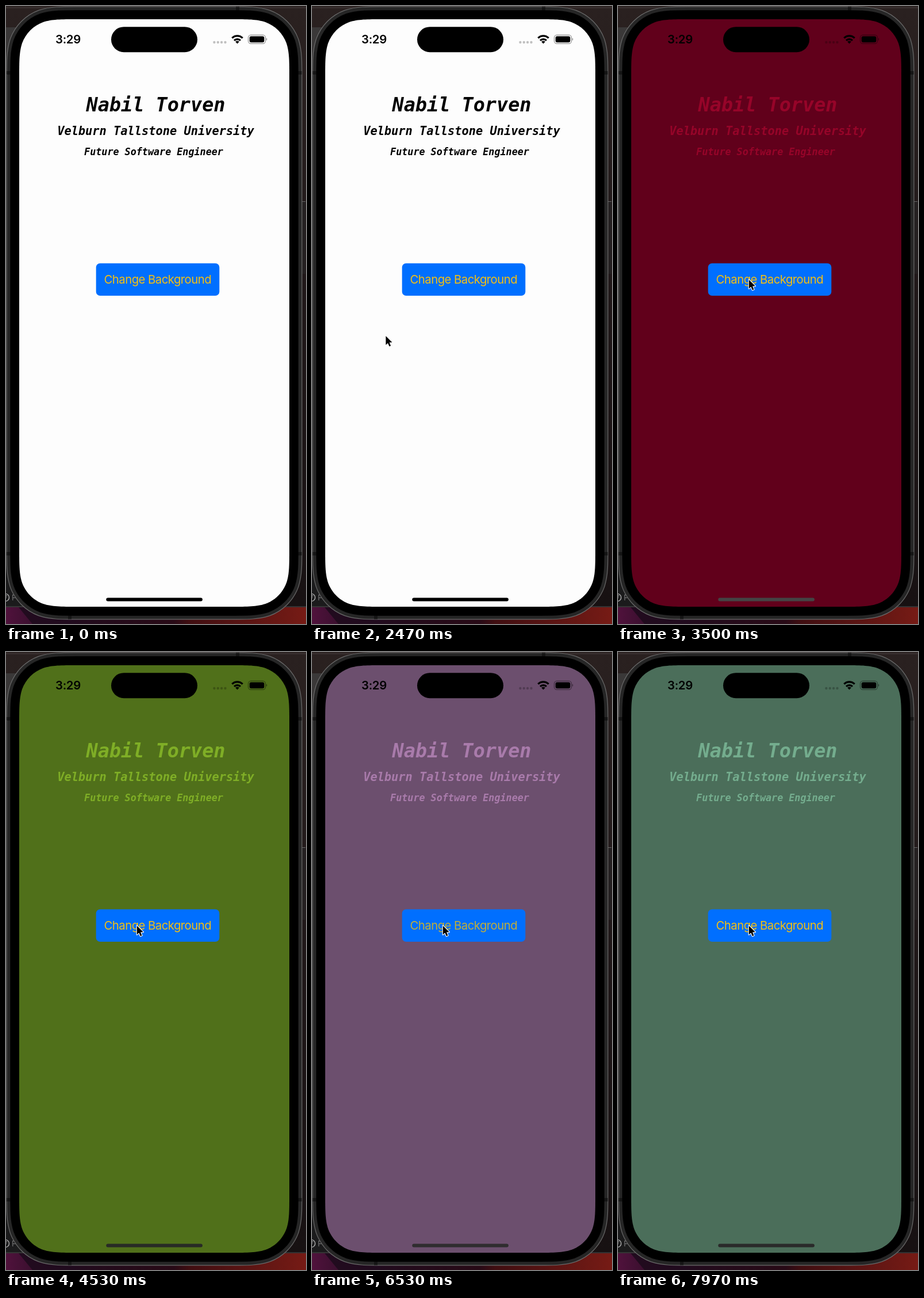
An HTML page that plays this animation: 522x1073 px, repeating every 8 s.

```html
<!DOCTYPE html>
<html lang="en">
<head>
<meta charset="utf-8">
<title>Change Background</title>
<style>
html, body { margin: 0; width: 100%; height: 100%; overflow: hidden; background: #1b1516; }
svg { display: block; width: 100vw; height: 100vh; }
.ui { font-family: Inter, sans-serif; font-size: 20.33px; }
.mono { font-family: "DejaVu Sans Mono", monospace; font-weight: 700; font-style: italic; text-anchor: middle; }
</style>
</head>
<body>
<svg viewBox="0 0 522 1073">
  <defs>
    <linearGradient id="wall">
      <stop offset="0" stop-color="#50123c"/>
      <stop offset=".09" stop-color="#3a0f2e"/>
      <stop offset=".2" stop-color="#210b1e"/>
      <stop offset=".56" stop-color="#280a16"/>
      <stop offset=".61" stop-color="#400e11"/>
      <stop offset="1" stop-color="#761b15"/>
    </linearGradient>
    <linearGradient id="side" x2="0" y2="1">
      <stop offset="0" stop-color="#2a2120"/>
      <stop offset=".5" stop-color="#1f1718"/>
      <stop offset="1" stop-color="#171112"/>
    </linearGradient>
  </defs>

  <!-- desktop behind the phone -->
  <path fill="url(#side)" d="M0 0H522V1044H0Z"/>
  <path fill="#3a3838" d="M0 37H40V120H0Z"/>
  <path fill="#1b1b1c" d="M0 120H60V1043H0Z"/>
  <path fill="#4a4343" d="M0 2.5H522V3.5H0Z"/>
  <path fill="url(#wall)" d="M0 1044H522V1073H0Z"/>
  <path fill="#210b1e" d="M22 1044H120V1073H46Z"/>
  <path fill="#555" d="M0 1042.5H522V1043.5H0Z"/>
  <circle cx="-1" cy="1027" r="6.5" fill="none" stroke="#bbb" stroke-width="1.3"/>
  <path d="M-2 1024H2M-2 1027H1" stroke="#bbb"/>
  <text x="10" y="1032" class="ui" style="font-size:13px" fill="#777">F</text>
  <path fill="#242021" d="M515 339H521V465H515Z"/>
  <path fill="#666" d="M515 339H521V340H515Z"/>

  <!-- phone body: rings of one outline, widest first -->
  <path class="body" stroke="#6a6a6a" stroke-width="45"/>
  <path class="body" stroke="#262626" stroke-width="42.6"/>
  <path fill="#151515" d="M400 1.5H406V8H400ZM108 1058H114V1064.5H108ZM1.5 113H8V119H1.5ZM1.5 948H8V954H1.5ZM508 113H514.5V119H508ZM508 948H514.5V954H508Z"/>
  <path class="body" stroke="#000" stroke-width="31.4"/>
  <path class="body" id="screen"/>

  <!-- status bar -->
  <text x="86" y="65.3" class="ui" font-weight="600" letter-spacing="-.3">3:29</text>
  <rect x="183" y="36.2" width="150" height="44" rx="22"/>
  <path d="M362.4 63h0M368.8 63h0M375.1 63h0M381.5 63h0" stroke="#000" stroke-width="4.4" stroke-linecap="round" opacity=".23"/>
  <g fill="none" stroke="#000" stroke-width="3.1">
    <path d="M393.3 55.7A13 13 0 0 1 411.7 55.7"/>
    <path d="M397 59.8A8 8 0 0 1 408 59.8"/>
  </g>
  <path d="M402.5 65.4L399.2 62.1A4.7 4.7 0 0 1 405.8 62.1Z"/>
  <rect x="421.5" y="50.3" width="30" height="15" rx="4.6" fill="none" stroke="#000" stroke-width="1.2" opacity=".42"/>
  <rect x="423.7" y="52.4" width="25.6" height="10.8" rx="2.9"/>
  <path d="M452.9 55.3Q455.6 57.8 452.9 60.3Z" opacity=".48"/>

  <!-- app -->
  <g id="labels" class="mono">
    <text x="260.5" y="182.6" font-size="33.5">Nabil Torven</text>
    <text x="260.5" y="223.6" font-size="20.33">Velburn Tallstone University</text>
    <text x="257" y="259.4" font-size="16.74">Future Software Engineer</text>
  </g>
  <rect x="156.7" y="446.7" width="214.6" height="56.4" rx="7" fill="#006fff"/>
  <text id="caption" x="170.5" y="482.4" class="ui" letter-spacing="-.54">Change Background</text>
  <rect id="home" x="174.3" y="1027.4" width="167.6" height="6" rx="3"/>

  <path id="cursor" d="M0 0V17.8L4.1 14L7 20.7L10 19.4L7.2 12.9L12.7 12.6Z" stroke="#fff" stroke-width="2.6" paint-order="stroke" stroke-linejoin="round"/>
</svg>
<script>
const LOOP = 8000;
const PRESS = 150;
const $ = id => document.getElementById(id);

// start time, background, label colour, home bar colour
const themes = [
  [0, '#fdfdfd', '#000', '#000'],
  [3420, '#61001b', '#960429', '#444344'],
  [4380, '#50701a', '#7fae26', '#282a25'],
  [5430, '#6c4f6e', '#a97bab', '#2f2d2f'],
  [6620, '#121814', '#1a2821', '#444443'],
  [7810, '#4b6e5a', '#74ad8e', '#2a2a2a']
];

// time, x, y of the pointer tip
const track = [[1950, -16, 790], [2470, 128.4, 573], [2560, 128.4, 573], [3120, 227.8, 475.3]];

// box with smooth corners: each one eases in, turns, and eases out
function squircle(x, y, w, h, r) {
  const bend = [1.528, 0, 1.088, 0, 0.868, 0, 0.631, 0.075, 0.373, 0.169,
    0.169, 0.373, 0.075, 0.631, 0, 0.868, 0, 1.088, 0, 1.528].map(v => v * r);
  const corner = (cx, cy, sx, sy, reverse) => {
    const pts = [];
    for (let i = 0; i < bend.length; i += 2) pts.push([cx + sx * bend[i], cy + sy * bend[i + 1]]);
    if (reverse) pts.reverse();
    return `${pts[0]}C${pts.slice(1).join(' ')}`;
  };
  return 'M' + [
    corner(x, y, 1, 1, true),
    corner(x + w, y, -1, 1, false),
    corner(x + w, y + h, -1, -1, true),
    corner(x, y + h, 1, -1, false)
  ].join('L') + 'Z';
}

function pointer(t) {
  const i = track.findIndex(p => p[0] > t);
  if (i === 0) return [-50, -50];
  if (i < 0) return track[track.length - 1].slice(1);
  const [t0, x0, y0] = track[i - 1], [t1, x1, y1] = track[i];
  const u = (t - t0) / (t1 - t0), k = u * u * (3 - 2 * u);
  return [x0 + (x1 - x0) * k, y0 + (y1 - y0) * k];
}

function draw(now) {
  const t = now % LOOP;
  const [, back, label, bar] = themes.filter(s => s[0] <= t).pop();
  const pressed = themes.some(([at]) => t < at && t >= at - PRESS);
  const [x, y] = pointer(t);
  $('screen').setAttribute('fill', back);
  $('labels').setAttribute('fill', label);
  $('home').setAttribute('fill', bar);
  $('caption').setAttribute('fill', pressed ? '#bfae3a' : '#f2bf12');
  $('cursor').setAttribute('transform', `translate(${x} ${y}) scale(.87)`);
}

const outline = squircle(23, 23, 470, 1020, 66);
document.querySelectorAll('.body').forEach(p => p.setAttribute('d', outline));

const start = performance.now();
function tick() {
  draw(performance.now() - start);
  requestAnimationFrame(tick);
}
tick();
</script>
</body>
</html>
```
